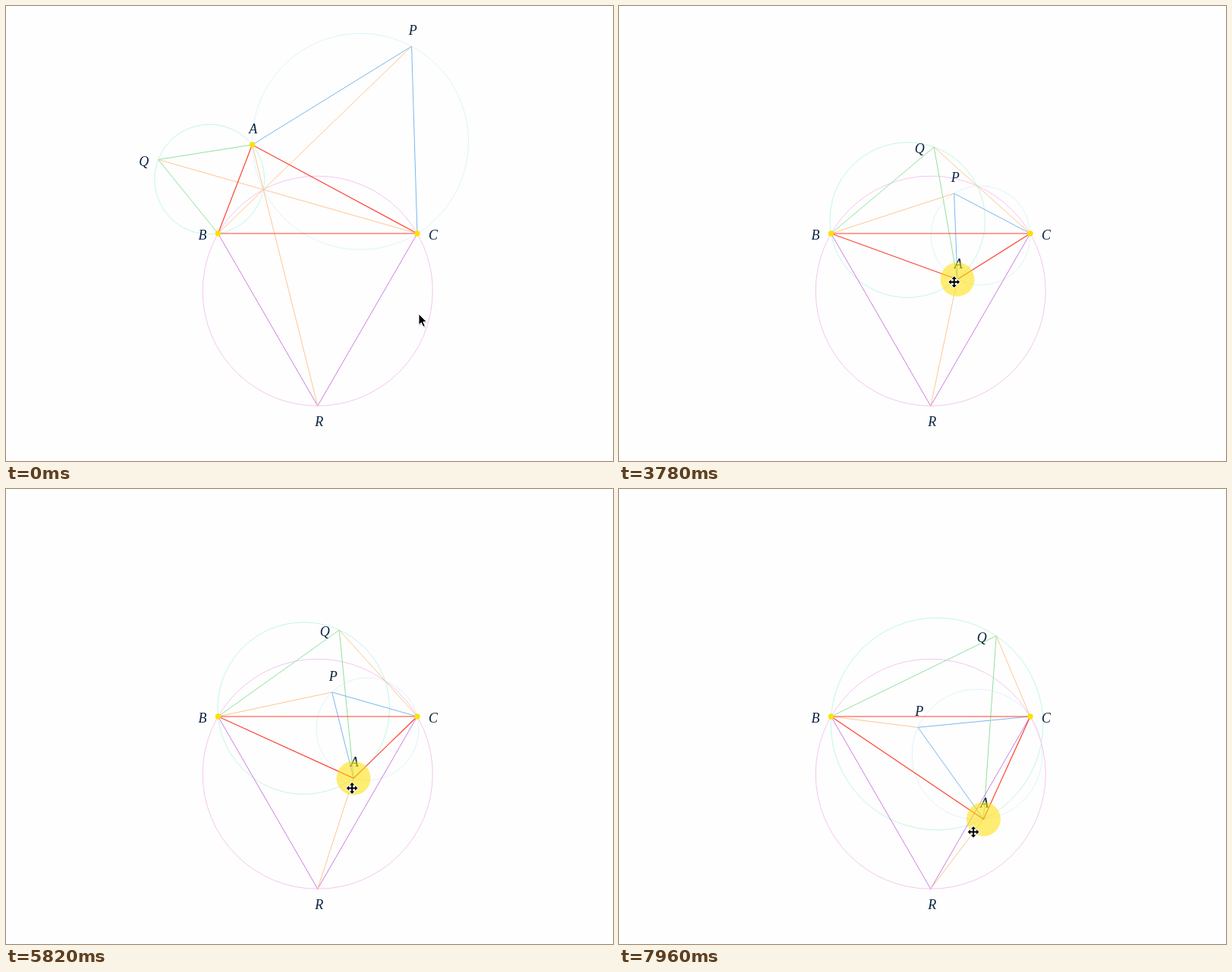
Recreate the animation shown at these times as an HTML page. Size 800 by 600 pixels, loop 8 s.

```html
<!DOCTYPE html>
<html lang="en">
<head>
<meta charset="utf-8">
<title>Equilateral triangles on a triangle</title>
<style>
  html, body { margin: 0; width: 100%; height: 100%; overflow: hidden; background: #fefefe; }
  svg { display: block; width: 800px; height: 600px; }
  text { font: italic 18px "Liberation Serif", "Times New Roman", serif; fill: #0a2240; text-anchor: middle; }
  .thin { fill: none; stroke-width: 1; }
</style>
</head>
<body>
<svg id="stage" viewBox="0 0 800 600"></svg>
<script>
const LOOP = 8000, LEAD = 60, GOLD = '#ffe000';
const B = [279.5, 300], C = [542, 300];

// Key points of the dragged vertex: time, x, y
const DRAG = [
  [2450, 324.5, 183], [3250, 412, 289.5], [3780, 446, 360.5], [4080, 446, 360.5],
  [4330, 448, 412], [4700, 348, 444], [4890, 326, 426.2], [5200, 350, 362],
  [5450, 410, 343], [5820, 458, 381.2], [6030, 452, 418], [6300, 405, 442],
  [6560, 358, 425], [6760, 345.5, 382.7], [7050, 366, 342], [7420, 392, 324],
  [7850, 487, 410], [7960, 480.5, 435.2], [8060, 468, 453]
];

const stage = document.getElementById('stage');

function set(el, attrs) {
  for (const k in attrs) el.setAttribute(k, attrs[k]);
  return el;
}
function add(tag, attrs, parent = stage) {
  return parent.appendChild(set(document.createElementNS('http://www.w3.org/2000/svg', tag), attrs));
}

const thin = (tag, stroke) => add(tag, { class: 'thin', stroke });
const ringP = thin('circle', '#dff3fb');
const ringQ = thin('circle', '#c2f7e5');
const ringR = thin('circle', '#f5c6ef');
const sideP = thin('polyline', '#7ab7ee');
const sideQ = thin('polyline', '#92e09e');
const sideR = thin('polyline', '#cd7de2');
const cross = ['BP', 'CQ', 'AR'].map(() => thin('polyline', '#ffc593'));
const triangle = add('polygon', { fill: 'none', stroke: '#ff4234', 'stroke-width': 1.2, 'stroke-linejoin': 'round' });

// Label offsets from the points
const OFFSETS = { A: [1.3, -15], B: [-20.5, 8], C: [21, 8], P: [1.7, -15], Q: [-19, 8], R: [2, 27] };
const labels = {};
for (const name in OFFSETS) {
  labels[name] = add('text', {});
  labels[name].textContent = name;
}
for (const [cx, cy] of [B, C]) add('circle', { cx, cy, r: 3.7, fill: GOLD });
const handle = add('circle', { fill: GOLD });

const arrow = add('g', {});
const arrowPath = 'M0 0V14.6L3.3 11.6L5.8 17L8.3 15.9L5.9 10.6H10.4Z';
add('path', { d: arrowPath, opacity: 0.2, transform: 'translate(.8 1.4)' }, arrow);
add('path', { d: arrowPath, stroke: '#fff' }, arrow);

const mover = add('g', {});
const arm = 'M0 -7.4L3.2 -4H1V0H-1V-4H-3.2Z';
for (const style of [{ fill: '#fff', stroke: '#fff', 'stroke-width': 1.8 }, { fill: '#000' }])
  for (let i = 0; i < 4; i++) add('path', { d: arm, transform: `rotate(${i * 90})`, ...style }, mover);

const clamp = v => Math.min(1, Math.max(0, v));
const ease = v => v * v * (3 - 2 * v);
const mix = (a, b, k) => a + (b - a) * k;
const part = (t, from, to) => clamp((t - from) / (to - from));
const same = (a, b) => a[1] === b[1] && a[2] === b[2];

function slope(i, axis) {
  const a = DRAG[i - 1], p = DRAG[i], b = DRAG[i + 1];
  if (!a || !b || same(a, p) || same(p, b)) return 0;
  return (b[axis] - a[axis]) / (b[0] - a[0]);
}

// Smooth curve through the key points
function vertexAt(t) {
  let i = 0;
  while (i < DRAG.length - 2 && DRAG[i + 1][0] <= t) i++;
  const p = DRAG[i], q = DRAG[i + 1], h = q[0] - p[0];
  const s = part(t, p[0], q[0]);
  return [1, 2].map(n => mix(p[n], q[n], ease(s))
    + h * s * (1 - s) * ((1 - s) * slope(i, n) - s * slope(i + 1, n)));
}

// Third corner of the equilateral triangle on side ab
function apex(a, b) {
  const k = Math.sqrt(3) / 2;
  return [(a[0] + b[0]) / 2 + k * (b[1] - a[1]), (a[1] + b[1]) / 2 - k * (b[0] - a[0])];
}

const points = list => ({ points: list.map(p => p.map(v => v.toFixed(2)).join()).join(' ') });

function ring(el, a, b, c) {
  set(el, {
    cx: (a[0] + b[0] + c[0]) / 3,
    cy: (a[1] + b[1] + c[1]) / 3,
    r: Math.hypot(a[0] - b[0], a[1] - b[1]) / Math.sqrt(3)
  });
}

// The pointer comes in from the right, then runs slightly ahead of the vertex
function pointerAt(t) {
  const near = ease(part(t, 520, 1290)), hold = part(t, 1800, 1910);
  const [x, y] = vertexAt(t + LEAD);
  return {
    x: mix(mix(544, 328, near), x - 4.3, hold),
    y: mix(mix(406, 185, near), y + 3.4, hold),
    over: near > 0.985
  };
}

function draw(t) {
  const A = vertexAt(t);
  const P = apex(A, C), Q = apex(B, A), R = apex(C, B);
  const at = { A, B, C, P, Q, R };

  ring(ringP, A, C, P);
  ring(ringQ, A, B, Q);
  ring(ringR, B, C, R);
  set(sideP, points([A, P, C]));
  set(sideQ, points([A, Q, B]));
  set(sideR, points([B, R, C]));
  [[B, P], [C, Q], [A, R]].forEach((ends, i) => set(cross[i], points(ends)));
  set(triangle, points([A, B, C]));
  for (const name in at) {
    const [dx, dy] = OFFSETS[name];
    set(labels[name], { x: at[name][0] + dx, y: at[name][1] + dy });
  }

  const grow = part(t, 1310, 1470);
  set(handle, { cx: A[0], cy: A[1], r: mix(3.7, 22.5, grow), opacity: mix(1, 0.55, grow) });

  const { x, y, over } = pointerAt(t);
  const shift = { transform: `translate(${x} ${y})` };
  set(arrow, { ...shift, visibility: over ? 'hidden' : 'visible' });
  set(mover, { ...shift, visibility: over ? 'visible' : 'hidden' });
}

const begin = performance.now();
function tick() {
  draw((performance.now() - begin) % LOOP);
  requestAnimationFrame(tick);
}
tick();
</script>
</body>
</html>
```
